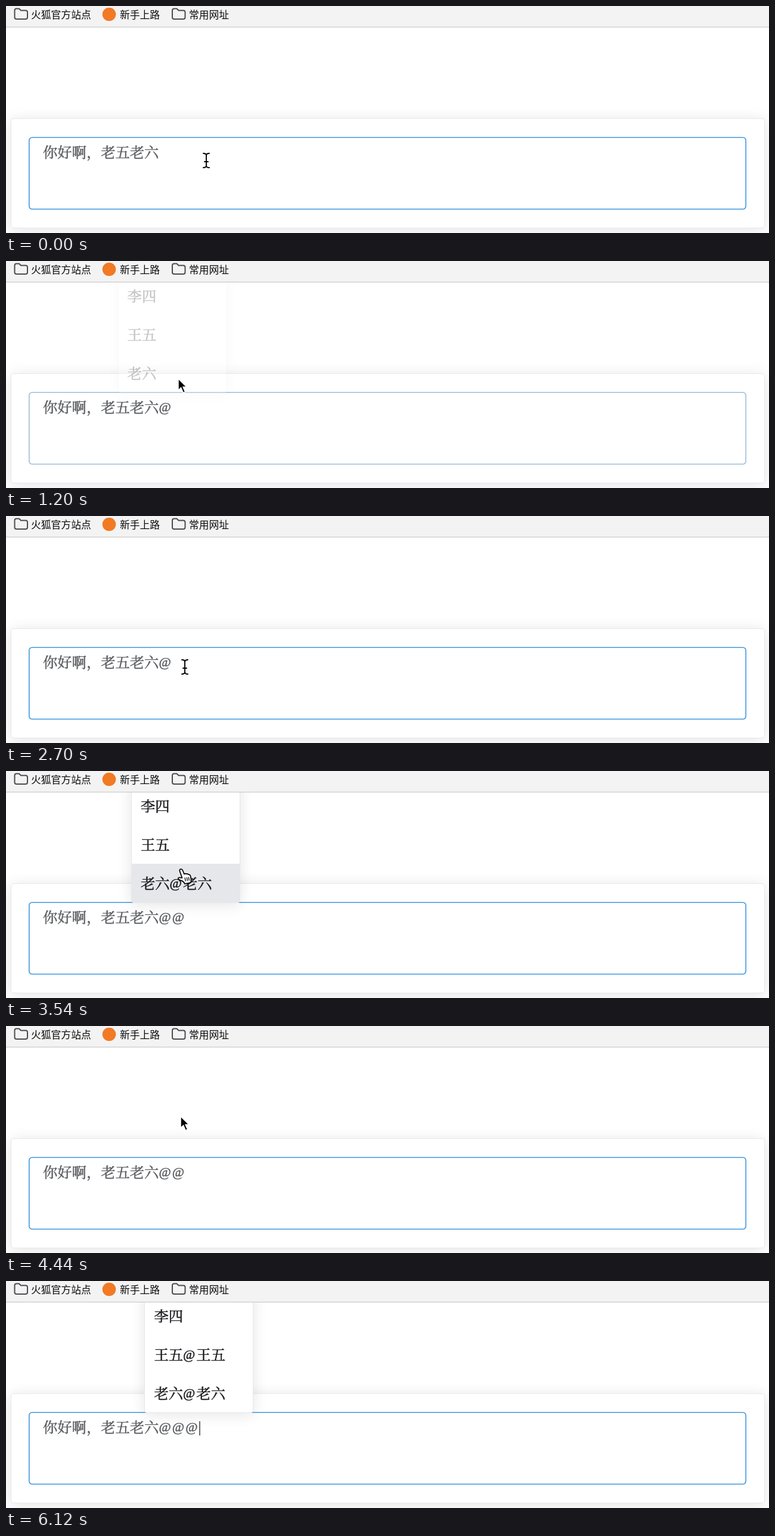
An HTML page for the animation above (6180 ms loop, 1280 px wide and 382 px high).

```html
<!DOCTYPE html>
<html lang="zh-CN">
<head>
<meta charset="utf-8">
<title>Mention input</title>
<style>
html, body { margin: 0; width: 100%; height: 100%; overflow: hidden; background: #fff; }
#stage { position: relative; width: 1280px; height: 382px; overflow: hidden; background: #fff; }
#stage div, #stage svg { position: absolute; box-sizing: border-box; left: 0; top: 0; }
#stage #bar { width: 1280px; height: 36px; background: #f3f3f3; border-bottom: 1px solid #c3c3c3; }
#stage #bar div { line-height: 29px; white-space: nowrap; color: #0c0c0d;
  font-family: "Noto Sans CJK SC", "Noto Sans CJK", sans-serif; font-size: 16.8px; }
#stage #page { top: 36px; width: 1280px; height: 346px; overflow: hidden; }
#stage #card { left: 7.5px; top: 153px; width: 1265.5px; height: 185px; background: #fff;
  border: 1px solid #e6e8ec; border-radius: 5px; box-shadow: 0 3px 24px rgba(0,0,0,.11); }
.text { white-space: nowrap; line-height: 36px; font-weight: 500; font-size: 24.3px; -webkit-text-stroke: .55px;
  font-family: "Liberation Serif", "Noto Serif CJK SC", "Songti SC", "Noto Sans CJK SC", serif; }
.text i { position: relative; top: -2px; font-style: normal; font-size: 22px; line-height: 1; letter-spacing: 2.1px; }
#stage #value { left: 62px; top: 193px; color: #5c5e62; }
#stage #caret { top: 200px; width: 2px; height: 24px; background: #6a6c70; }
#stage #popup { top: -80px; width: 183px; height: 265.5px; background: #fff; border: 1px solid #e4e7ed;
  border-radius: 4px; box-shadow: 0 3px 24px rgba(0,0,0,.11); }
#stage .row { width: 100%; height: 65.5px; padding: 16.5px 0 0 15px; color: #1c1d20; }
</style>
</head>
<body>
<div id="stage">
  <div id="page">
    <div id="card"></div>
    <svg width="1280" height="346">
      <rect id="field" x="38.8" y="185.2" width="1202.4" height="120.6" rx="5" fill="none" stroke-width="1.6"/>
    </svg>
    <div id="value" class="text"></div>
    <div id="caret"></div>
    <div id="popup">
      <div class="row text"></div>
      <div class="row text"></div>
      <div class="row text"></div>
    </div>
  </div>
  <div id="bar">
    <svg width="400" height="35" fill="none" stroke="#4c4c4f" stroke-width="2" stroke-linejoin="round">
      <path id="folder" d="M14.5 7.5Q14.5 4.5 17.5 4.5H22L25 7.5H33Q36 7.5 36 10.5V19Q36 22 33 22H17.5Q14.5 22 14.5 19Z"/>
      <use href="#folder" x="264.5"/>
      <circle cx="173" cy="14" r="11.3" fill="#f27a24" stroke="none"/>
    </svg>
    <div style="left:42px">火狐官方站点</div>
    <div style="left:191px">新手上路</div>
    <div style="left:307px">常用网址</div>
  </div>
  <svg width="1280" height="382">
    <g id="beam" fill="none" stroke-linecap="round">
      <path id="bar-shape" d="M-5-12Q0-12 0-8.5Q0-12 5-12M0-9V9M-5 12Q0 12 0 8.5Q0 12 5 12M-3 2H3" stroke="#000" stroke-width="1.9"/>
    </g>
    <path id="arrow" d="M0 0V19.5L4.6 15.2L8.2 23.6L11.6 22.1L8 14H14Z" fill="#000" stroke="#fff" stroke-width="1.5"/>
    <g id="hand" stroke="#000" stroke-width="1.7" stroke-linejoin="round" stroke-linecap="round">
      <path d="M-2.6 2.2Q-3-.6-.6-.8Q1.6-1 2.6 1.6L5 7.6Q6.4 6 8.6 7.4Q10.6 6.2 12 8.4Q14.6 7.6 15.6 11Q17.4 17 16 22L6 24Q4.5 20-.5 18.2L-5 16Q-5.8 13.2-2.5 13.4L1.5 14Z" fill="#fff"/>
      <path d="M6.2 14L7.2 19M9.4 13.4L10.4 18.4M12.4 13L13.2 18" fill="none" stroke-width="1.3"/>
    </g>
  </svg>
</div>
<script>
const LOOP = 6180, STEP = 60;
const $ = id => document.getElementById(id);
const rows = [...document.querySelectorAll('.row')];

// each round: type "@", wake the mouse, pick a name, blur, focus again
const rounds = [
  { type: 180, wake: 600, pick: 1080, blur: 1080, focus: 2160 },
  { type: 2880, wake: 3240, pick: 4260, blur: 4440, focus: 5280 },
  { type: 5760, wake: LOOP, pick: LOOP, blur: LOOP, focus: LOOP }
];
const moves = [
  { start: 540, time: 240, x: 289, y: 198 },
  { start: 1560, time: 420, x: 300, y: 254 },
  { start: 3180, time: 490, x: 293, y: 152 },
  { start: 4740, time: 300, x: 326, y: 246 }
];

const ramp = (t, start, time) => Math.min(1, Math.max(0, (t - start) / time));
const ease = p => 1 - (1 - p) ** 1.5;
const mix = (a, b, p) => `rgb(${a.map((v, i) => Math.round(v + (b[i] - v) * p))})`;

function mouse(t) {
  let x = 336, y = 260;
  for (const m of moves) {
    const p = ease(ramp(t, m.start, m.time));
    x += (m.x - x) * p;
    y += (m.y - y) * p;
  }
  return [x, y];
}

function setText(el, s) {
  if (el.textContent !== s) el.innerHTML = s.replaceAll('@', '<i>@</i>');
}

function draw(t) {
  const n = rounds.filter(r => t >= r.type).length;
  const r = rounds[Math.max(0, n - 1)];
  const [x, y] = mouse(t);
  const hidden = t >= r.type && t < r.wake;
  const alpha = ramp(t, r.type - STEP, 120) * (1 - ramp(t, r.pick - STEP, 240));
  const focus = 1 - ramp(t, r.blur, 180) + ramp(t, r.focus, 240);
  const blink = rounds.some(k => [k.type, k.focus].some(s => t >= s && t < s + 540));

  setText($('value'), '你好啊，老五老六' + '@'.repeat(n));
  $('field').setAttribute('stroke', mix([205, 208, 213], [64, 152, 222], focus));
  $('caret').style.left = 256.5 + 22.4 * n + 'px';
  $('caret').style.visibility = blink ? 'visible' : 'hidden';

  $('popup').style.left = 165.2 + 22.4 * n + 'px';
  $('popup').style.opacity = n ? alpha : 0;
  const names = ['李四', n > 2 ? '王五@王五' : '王五', n > 1 ? '老六@老六' : '老六'];
  const over = n && alpha > .4 && !hidden && y < 221 ? (y > 156 ? 2 : 1) : -1;
  rows.forEach((row, i) => {
    setText(row, names[i]);
    row.style.top = 68.5 + 65.2 * i + 'px';
    row.style.background = i === over ? '#e6e7eb' : 'none';
  });

  const kind = over >= 0 ? 'hand' : y > 221 ? 'beam' : 'arrow';
  for (const id of ['beam', 'arrow', 'hand']) {
    $(id).style.display = !hidden && id === kind ? '' : 'none';
    $(id).setAttribute('transform', `translate(${x} ${y})`);
  }
}

const start = performance.now();
function tick() {
  const t = (performance.now() - start) % LOOP;
  draw(Math.floor(t / STEP) * STEP);
  requestAnimationFrame(tick);
}
tick();
</script>
</body>
</html>
```
